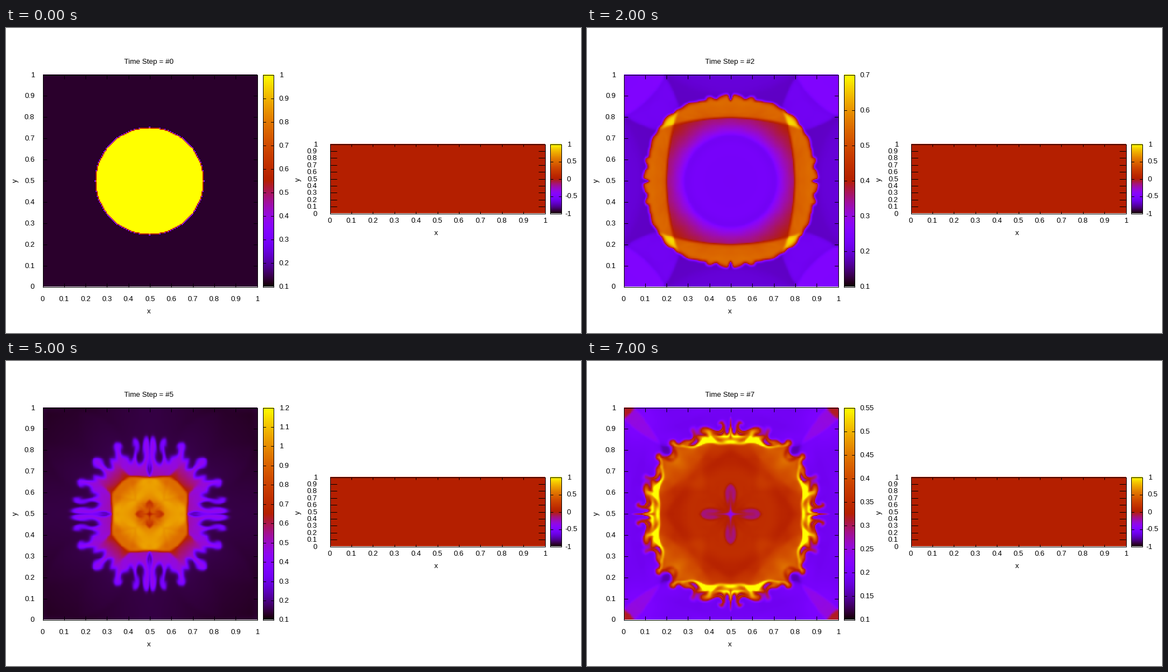
A matplotlib script that plays this animation: 1027x545 px, repeating every 8000 ms.

```python
import math

import matplotlib.pyplot as plt
import numpy as np
from matplotlib.animation import FuncAnimation

WIDTH, HEIGHT, DPI = 1027, 545, 100
STEPS = 8

# Gas blast in a closed box: one quadrant, cell 0 sits on the centre of the disc.
GAMMA = 1.4
CELLS = 100
H = 0.005
DISC_CELLS = 50
RHO_OUT, P_OUT = 0.125, 0.25
CFL = 0.4


def swap_axes(q):
    """Exchange x and y; the flow is symmetric about the diagonal."""
    return q.transpose(0, 2, 1)[[0, 2, 1, 3]]


def primitive(q):
    rho, mx, my, energy = q
    u, v = mx / rho, my / rho
    p = (GAMMA - 1) * (energy - 0.5 * rho * (u * u + v * v))
    return np.stack([rho, u, v, np.maximum(p, 1e-4)])


def hllc(left, right):
    rl, ul, _, pl = left
    rr, ur, _, pr = right
    cl, cr = np.sqrt(GAMMA * pl / rl), np.sqrt(GAMMA * pr / rr)
    sl = np.minimum(ul - cl, ur - cr)
    sr = np.maximum(ul + cl, ur + cr)
    ql, qr = rl * (sl - ul), rr * (sr - ur)
    sm = (pr - pl + ul * ql - ur * qr) / (ql - qr)

    from_left = sm >= 0
    rho, u, v, p = np.where(from_left, left, right)
    s = np.where(from_left, sl, sr)
    energy = p / (GAMMA - 1) + 0.5 * rho * (u * u + v * v)
    state = np.stack([rho, rho * u, rho * v, energy])
    flux = u * state
    flux[1] += p
    flux[3] += u * p
    k = rho * (s - u) / (s - sm)
    e_star = energy / rho + (sm - u) * (sm + p / (rho * (s - u)))
    star = np.stack([k, k * sm, k * v, k * e_star])
    return flux + np.where((sl < 0) & (sr > 0), s, 0) * (star - state)


def rate(q):
    w = primitive(q)
    g = np.concatenate([w[:, 2:0:-1], w, w[:, :-3:-1]], axis=1)
    g[1, :2] *= -1
    g[1, -2:] *= -1
    d = np.diff(g, axis=1)
    a, b = d[:, :-1], d[:, 1:]
    ab = a * b
    smooth = ab > 0
    half = np.where(smooth, ab, 0) / np.where(smooth, a + b, 1)
    mid = g[:, 1:-1]
    flux = hllc((mid + half)[:, :-1], (mid - half)[:, 1:])
    change = -np.diff(flux, axis=1) / H
    return change + swap_axes(change)


def simulate(t_end):
    i = np.arange(CELLS)
    inside = i[:, None] ** 2 + i[None, :] ** 2 <= DISC_CELLS ** 2
    q = np.zeros((4, CELLS, CELLS))
    q[0] = np.where(inside, 1, RHO_OUT)
    q[3] = np.where(inside, 1, P_OUT) / (GAMMA - 1)
    t, times, density = 0.0, [0.0], [q[0].copy()]
    count = 0
    while t < t_end:
        rho, u, _, p = primitive(q)
        dt = CFL * H / np.max(np.abs(u) + np.sqrt(GAMMA * p / rho))
        q1 = q + dt * rate(q)
        q = 0.5 * (q + q1 + dt * rate(q1))
        t += dt
        count += 1
        if count % 2 == 0:
            times.append(t)
            density.append(q[0].copy())
    return np.array(times), density


def pick_steps():
    """Output interval: the fourth output comes just after the waves meet."""
    times, density = simulate(1.3)
    centre = np.array([r[0, 0] for r in density])
    rise = np.gradient(centre, times)
    rise[(times < 0.58) | (times > 0.78)] = -1e9
    interval = np.clip((times[np.argmax(rise)] + 0.02) / 4, 0.155, 0.185)
    return [density[np.argmin(np.abs(times - k * interval))] for k in range(STEPS)]


def quads(quarter):
    """Whole field as quads, each the mean of its four corners."""
    idx = np.minimum(np.abs(np.arange(1 - CELLS, CELLS + 1)), CELLS - 1)
    f = quarter[np.ix_(idx, idx)].T
    return (f[:-1, :-1] + f[1:, :-1] + f[:-1, 1:] + f[1:, 1:]) / 4


def palette(t):
    t = np.clip(t, 0, 1)
    return np.stack([np.sqrt(t), t ** 3,
                     np.clip(np.sin(2 * np.pi * t), 0, 1)], axis=-1)


fields = [quads(r) for r in pick_steps()]


def ceil_tenth(k):
    return max(0.6, math.ceil(fields[k].max() * 10 - 1e-6) / 10)


# low end, high end, tick spacing of the colour scale
scales = [(0.1, 1, 0.1), (0.1, 1, 0.1), (0.1, 0.7, 0.1),
          (0, ceil_tenth(3), 0.1), (0.1, 0.7, 0.1), (0.1, 1.2, 0.1),
          (0.1, ceil_tenth(6), 0.1), (0.1, 0.55, 0.05)]

plt.rcParams["font.family"] = "Liberation Sans"
fig = plt.figure(figsize=(WIDTH / DPI, HEIGHT / DPI), dpi=DPI, facecolor="white")
ax = fig.add_axes([0, 0, 1, 1])
ax.axis("off")

LEFT = (65.5, 448.5, 462.5, 83.5)
LEFT_BAR = (458.5, 477.5, 462.5, 83.5)
RIGHT = (578.5, 962.5, 331.5, 207.5)
RIGHT_BAR = (971.5, 991.5, 331.5, 207.5)


def image(rgb, box):
    return ax.imshow(rgb, extent=box, origin="lower", aspect="auto",
                     interpolation="nearest", zorder=1)


def line(xs, ys):
    return ax.plot(xs, ys, color="black", lw=0.72, zorder=3,
                   solid_capstyle="butt")[0]


def label(x, y, s, ha="center", **kw):
    kw.setdefault("va", "baseline")
    return ax.text(x, y, s, ha=ha, fontsize=13 * 72 / DPI, color="black",
                   zorder=4, **kw)


def frame(box):
    x0, x1, y0, y1 = box
    line([x0, x1, x1, x0, x0], [y0, y0, y1, y1, y0])


def side_ticks(box, y, size):
    x0, x1 = box[:2]
    return [line([x0, x0 + size], [y, y]), line([x1 - size, x1], [y, y])]


def axes_box(box, x_tick, y_tick, x_base, y_edge):
    x0, x1, y0, y1 = box
    frame(box)
    for k in range(11):
        x = x0 + (x1 - x0) * k / 10
        y = y0 + (y1 - y0) * k / 10
        text = f"{k / 10:g}"
        label(x, x_base, text)
        label(y_edge, y + 4, text, ha="right")
        if 0 < k < 10:
            line([x, x], [y0, y0 - x_tick])
            line([x, x], [y1, y1 + x_tick])
            side_ticks(box, y, y_tick)


def bar_ticks(box, lo, hi, step, text_x):
    made = []
    y0, y1 = box[2:]
    count = round((hi - lo) / step)
    for k in range(count + 1):
        value = round(lo + k * step, 6)
        y = y0 + (y1 - y0) * k / count
        x = text_x - (3.5 if value < 0 else 0)
        made.append(label(x, y + 4, f"{value:g}", ha="left"))
        if 0 < k < count:
            made += side_ticks(box, y, 5)
    return made


ramp = palette(np.linspace(0, 1, 380))[:, None, :]
field_image = image(palette(fields[0]), LEFT)
image(palette(np.full((1, 1), 0.5)), RIGHT)
for bar in (LEFT_BAR, RIGHT_BAR):
    image(ramp, bar)
    frame(bar)

axes_box(LEFT, 7, 7, 487.5, 51)
axes_box(RIGHT, 4, 12, 347.5, 556)
bar_ticks(RIGHT_BAR, -1, 1, 0.5, 1001.8)
label(255, 509.5, "x")
label(768.5, 369.5, "x")
label(16.5, 273, "y", rotation=90, va="center")
label(521.5, 270.5, "y", rotation=90, va="center")
title = label(255, 64, "")

ax.set_xlim(0, WIDTH)
ax.set_ylim(HEIGHT, 0)

scale_marks = []


def update(k):
    lo, hi, step = scales[k]
    field_image.set_data(palette((fields[k] - lo) / (hi - lo)))
    title.set_text(f"Time Step = #{k}")
    while scale_marks:
        scale_marks.pop().remove()
    scale_marks.extend(bar_ticks(LEFT_BAR, lo, hi, step, 488))
    return []


anim = FuncAnimation(fig, update, frames=STEPS, interval=1000,
                     init_func=lambda: update(0), repeat=True, repeat_delay=0)
plt.show()
```
